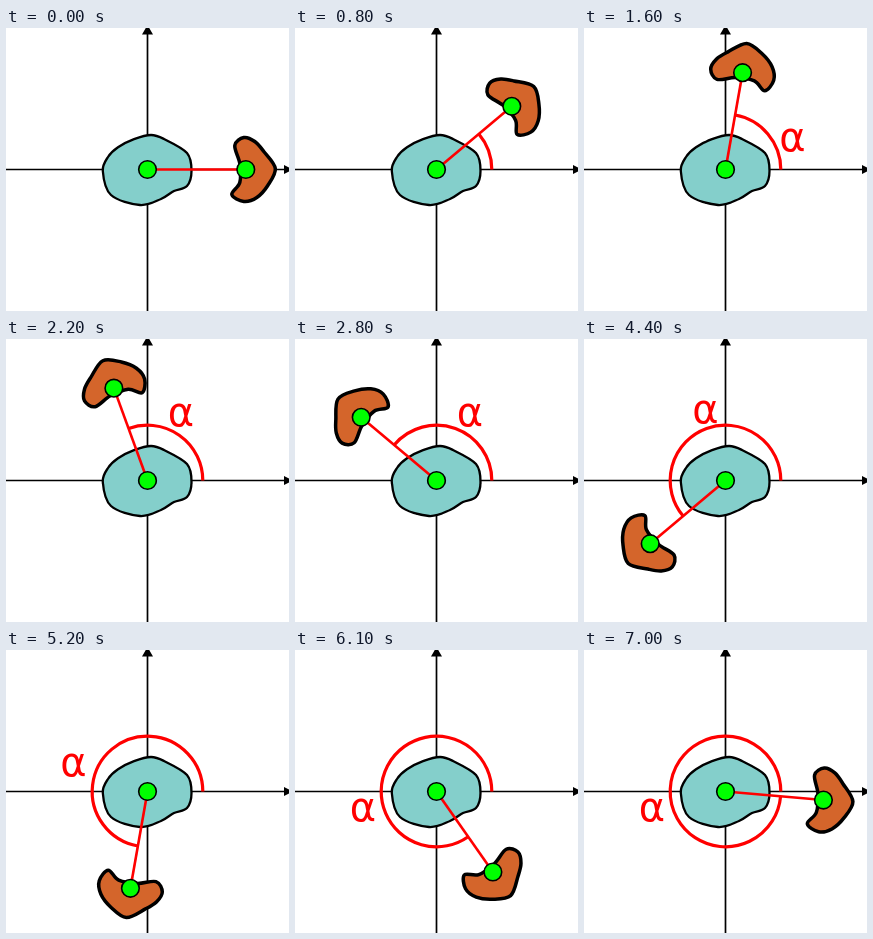
An HTML page that plays this animation: 283 by 283 pixels, repeating every 7100 ms.

```html
<!DOCTYPE html>
<html lang="en">
<head>
<meta charset="utf-8">
<title>Angle of rotation</title>
<style>
  html, body { margin: 0; height: 100%; overflow: hidden; background: #fff; }
  svg { display: block; width: 100vw; height: 100vh; }
  path, line { fill: none; stroke: #000; stroke-linejoin: round; }
  .red { stroke: #f00; }
  .dot { fill: #0f0; stroke: #000; stroke-width: 1.6; }
  text { font: 40px "DejaVu Sans", sans-serif; fill: #f00; text-anchor: middle; }
</style>
</head>
<body>
<svg viewBox="0 0 283 283">
  <path d="M0 141.5H280M141.5 283V4" stroke-width="1.7"/>
  <path d="M278 137L287 141.5L278 146ZM136 6.5L141.5 -3L147 6.5Z" style="fill:#000;stroke:none"/>
  <path id="body" style="fill:#84cfcb" stroke-width="2.3"/>
  <path id="bean" style="fill:#d4652b" stroke-width="3.5"/>
  <path id="arc" class="red" stroke-width="3.2"/>
  <line id="arm" class="red" x1="141.5" y1="141.5" stroke-width="2.6"/>
  <circle class="dot" cx="141.5" cy="141.5" r="8.8"/>
  <circle id="tip" class="dot" r="8.8"/>
  <text id="label">α</text>
</svg>
<script>
const CENTER = 141.5, ORBIT = 98.3, ARC = 55.3;
const STEP_MS = 100, STEPS = 71, STEP_ANGLE = 5, SKIPPED_ANGLE = 340;
const $ = id => document.getElementById(id);
const set = (id, attrs) => {
  for (const key in attrs) $(id).setAttribute(key, attrs[key]);
};

// Closed Catmull-Rom curve through a few key points
function smooth(points) {
  const n = points.length;
  const at = i => points[(i + n) % n];
  let d = `M${points[0]}`;
  points.forEach((p, i) => {
    const prev = at(i - 1), next = at(i + 1), after = at(i + 2);
    const c1 = p.map((v, k) => v + (next[k] - prev[k]) / 6);
    const c2 = next.map((v, k) => v - (after[k] - p[k]) / 6);
    d += `C${c1} ${c2} ${next}`;
  });
  return d + "Z";
}

set("body", { d: smooth([
  [96.8, 143], [102, 129], [112, 119.3], [128, 111.2], [145, 107], [158, 111],
  [181, 125], [185.5, 143], [181, 158], [168, 163], [155, 171], [134, 177], [105, 167]
]) });

// Relative to the tip of the arm
set("bean", { d: smooth([
  [-11, -24], [-2, -32], [9, -28], [18, -18], [29.5, -1], [22, 16],
  [11, 28], [-2, 32], [-14, 25], [-6, 13], [-6, -6]
]) });

// The label hops around the arc: [first angle, x, baseline]
const hops = [
  [45, 208.5, 123], [90, 175, 87], [150, 121.5, 83.5], [225, 67.5, 125.5], [270, 68, 170.5]
];

const polar = (angle, r) => {
  const a = angle * Math.PI / 180;
  return [CENTER + r * Math.cos(a), CENTER - r * Math.sin(a)];
};

function draw(now) {
  let angle = Math.floor(now / STEP_MS) % STEPS * STEP_ANGLE;
  if (angle >= SKIPPED_ANGLE) angle += STEP_ANGLE;
  const [x, y] = polar(angle, ORBIT);

  set("bean", { transform: `translate(${x} ${y}) rotate(${-angle})` });
  set("arm", { x2: x, y2: y });
  set("tip", { cx: x, cy: y });
  set("arc", {
    d: `M${polar(0, ARC)}A${ARC} ${ARC} 0 ${+(angle > 180)} 0 ${polar(angle, ARC)}`
  });

  const [, labelX, labelY] = hops.findLast(([from]) => angle >= from) ?? [0, -99, 0];
  set("label", { x: labelX, y: labelY });
}

const start = performance.now();
function tick() {
  draw(performance.now() - start);
  requestAnimationFrame(tick);
}
tick();
</script>
</body>
</html>
```
